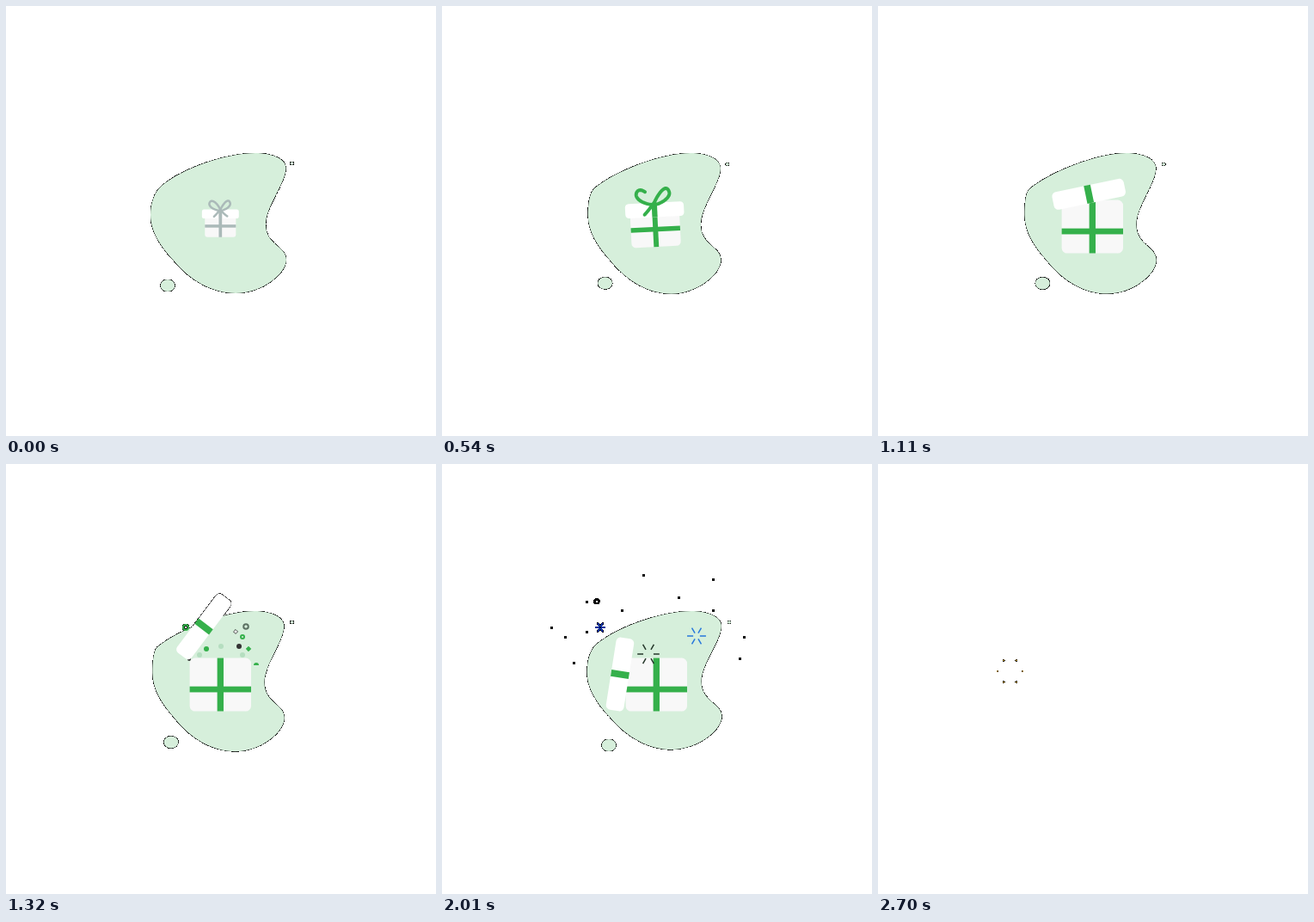
An HTML page with a canvas that plays this animation: 500 by 500 pixels, repeating every 2730 ms.

```html
<!DOCTYPE html>
<html lang="en">
<head>
<meta charset="utf-8">
<title>Gift</title>
<style>
html, body { margin: 0; width: 100%; height: 100%; overflow: hidden; background: #fff; }
canvas { display: block; width: 100vmin; height: 100vmin; }
</style>
</head>
<body>
<canvas id="stage" width="500" height="500"></canvas>
<script>
const ctx = document.getElementById('stage').getContext('2d', { willReadFrequently: true });
const LOOP = 2730, STEP = 30, SIZE = 500, TAU = Math.PI * 2;
const SCENE_END = 2640, LID_START = 1050, LID_PEAK = 1320, LID_REST = 1540;
const INK = '#222', MINT = '#d6efdb', GREEN = '#35b04b', BLUE = '#3d55f0',
  CYAN = '#1fc1ee', LIME = '#3fe02c', PINK = '#e5b8ea', DARK = '#333', PALE = '#b5dec0';

const clamp = v => Math.min(1, Math.max(0, v));
const progress = (t, from, to) => clamp((t - from) / (to - from));
const mix = (a, b, k) => a + (b - a) * k;
const easeOut = p => Math.sin(p * Math.PI / 2);

const leftBow = strand([0, -22, -14, -23, -29, -32, -23, -41], [-23, -41, -18, -48, -6, -38, 0, -24],
  [0, -24, 4, -19, 9, -14, 15, -10]);
const rightBow = strand([0, -22, 10, -23, 25, -32, 21, -40], [21, -40, 18, -49, 9, -42, 0, -25],
  [0, -25, -4, -20, -9, -14, -14, -9]);

// x, y, radius, colour at the middle of the flight
const confetti = [
  [158, 158, 3.4, BLUE], [199, 166, 3.5, LIME], [256, 158, 3.4, CYAN], [330, 158, 3.4, DARK],
  [363, 163, 2.8, LIME], [144, 192, 2.6, '#278ee8'], [168, 191, 3.3, CYAN], [135, 215, 3.2, DARK],
  [361, 191, 3.5, CYAN], [360, 195, 2.5, PINK], [403, 220, 3.4, LIME], [332, 223, 2.8, LIME],
  [178, 224, 2.5, BLUE], [203, 197, 2.6, LIME], [236, 185, 2.5, '#259df2'], [281, 185, 2.6, PINK],
  [305, 195, 2.5, BLUE], [301, 224, 2.6, LIME], [198, 216, 1.3, BLUE], [240, 196, 1.4, BLUE],
  [232, 208, 1.3, '#557'], [262, 204, 1.5, LIME], [273, 190, 1.3, '#446'], [279, 213, 1.4, BLUE],
  [291, 220, 1.5, LIME], [286, 234, 1.3, BLUE], [299, 233, 1.3, BLUE]
];

const specks = [
  [234, 129], [315, 134], [275, 155], [209, 170], [168, 160], [168, 195],
  [143, 201], [127, 190], [153, 231], [315, 170], [351, 201], [346, 226]
];

const bits = [
  [233, 215, 3, GREEN], [250, 212, 3, PALE], [271, 212, 3, DARK], [225, 222, 3, PALE],
  [275, 222, 3, PALE], [213, 227, 2, DARK], [209, 190, 3, GREEN, 'ring'],
  [279, 189, 2.8, '#5c7163', 'ring'], [275, 201, 2, GREEN, 'ring'],
  [267, 195, 2.5, '#fff', 'diamond'], [282, 215, 2.8, GREEN, 'diamond'], [291, 234, 3, GREEN, 'half']
];

const sparks = [
  [240, 221, 1750, '#26382b'], [296, 200, 1800, '#2878dc'], [184, 190, 1905, '#1440d0'],
  [358, 205, 2130, '#2878dc'], [153.5, 241, 2301, '#e8b93a']
];

function strand(...curves) {
  const points = [];
  for (const [x0, y0, x1, y1, x2, y2, x3, y3] of curves) {
    const at = (a, b, c, d, k) => a * (1 - k) ** 3 + 3 * b * k * (1 - k) ** 2 + 3 * c * k * k * (1 - k) + d * k ** 3;
    for (let i = 0; i <= 16; i++) points.push([at(x0, x1, x2, x3, i / 16), at(y0, y1, y2, y3, i / 16)]);
  }
  return points;
}

function drawStrand(points, part) {
  const count = Math.round(points.length * part);
  if (count < 2) return;
  ctx.beginPath();
  points.slice(0, count).forEach(p => ctx.lineTo(...p));
  ctx.stroke();
}

function oval(x, y, rx, ry, color) {
  if (rx <= 0) return;
  ctx.beginPath();
  ctx.ellipse(x, y, rx, ry, 0, 0, TAU);
  ctx.fillStyle = color;
  ctx.fill();
}

const disc = (x, y, r, color) => oval(x, y, r, r, color);

function circle(x, y, r, width, color) {
  ctx.beginPath();
  ctx.arc(x, y, r, 0, TAU);
  ctx.lineWidth = width;
  ctx.strokeStyle = color;
  ctx.stroke();
}

function roundRect(x, y, w, h, r, color) {
  ctx.beginPath();
  ctx.roundRect(x, y, w, h, r);
  ctx.fillStyle = color;
  ctx.fill();
}

function bar(x, y, w, h, color) {
  ctx.fillStyle = color;
  ctx.fillRect(x, y, w, h);
}

function placed(x, y, scale, angle, draw) {
  ctx.save();
  ctx.translate(x, y);
  ctx.rotate(angle);
  ctx.scale(scale, scale);
  draw();
  ctx.restore();
}

// The upper left corner gets tighter as the wave rises.
function blobPath(wave) {
  const x = mix(181, 173, wave), y = mix(209, 213.5, wave);
  return new Path2D(`M325.5 188C325 177 308 171 290 171C255 171 ${x + 24} ${y - 20} ${x} ${y}` +
    `C${mix(172, 169, wave)} ${mix(217, 218, wave)} 168 230 168 243C168 262 180 280 195 296` +
    'C214 319 240 334 267 334C298 334 326 311 326 295C326 279 302 278 302 254C302 233 326 205 325.5 188Z');
}

function drawBlob(t) {
  const wave = Math.sin(Math.PI * Math.min(t, 2200) / 2200);
  ctx.save();
  ctx.translate(249, 171);
  ctx.scale(1 - 0.03 * wave, 1 + 0.011 * wave - 0.014 * t / 2000);
  ctx.translate(-249, -171);
  ctx.fillStyle = MINT;
  ctx.fill(blobPath(wave));
  ctx.restore();
  const dip = t < 810 ? mix(325, 321, t / 810) : mix(321, 327, (t - 810) / 1200);
  oval(188 + 3 * t / 1000, dip, 8.4, 7, MINT);
  oval(t < 810 ? 332.5 - t / 810 : 331.5 + (t - 810) / 480, 183 + progress(t, 0, 540), 2, 1.7, MINT);
}

function lidPose(t) {
  const rise = progress(t, LID_START, LID_PEAK), fall = progress(t, LID_PEAK, LID_REST);
  if (t < LID_PEAK) {
    return [mix(249.5, 230, rise), mix(234.3, 189, easeOut(rise)), -53 * rise];
  }
  const settle = 3.5 * progress(t, 1560, 2010);
  return [mix(230, 207, fall), mix(189, 248, fall ** 1.5) - settle, mix(-53, -81, fall)];
}

function ribbonColor(t) {
  const k = progress(t, 0, 420);
  return `rgb(${mix(171, 53, k)},${mix(186, 176, k)},${mix(185, 75, k)})`;
}

function drawLid(color) {
  roundRect(-40.5, -10, 81, 20, 5, '#fff');
  bar(-3.7, -10, 7.4, 20, color);
}

// The gift sways about the middle of its base.
function drawGift(t) {
  const color = ribbonColor(t);
  const scale = Math.min(1.05, 0.53 + 0.00058 * t);
  const tilt = t < 810 ? 0.058 * Math.sin(TAU * t / 810) : 0;
  placed(249.3, 249.7 + 36 * scale, scale, tilt, () => {
    ctx.translate(0, -36);
    roundRect(-34, -23, 68, 59, 6, '#f8f8f8');
    bar(-3.5, -23, 7, 59, color);
    bar(-34, 8.5, 68, 6.5, color);
    if (t >= LID_START) return;
    placed(0, -15, 1, 0, () => drawLid(color));
    ctx.strokeStyle = color;
    ctx.lineWidth = 4.7;
    ctx.lineCap = ctx.lineJoin = 'round';
    drawStrand(leftBow, 1 - progress(t, 390, 690));
    drawStrand(rightBow, 1 - progress(t, 570, 960));
  });
}

function drawOpenLid(t) {
  if (t < LID_START) return;
  const [x, y, angle] = lidPose(t);
  placed(x, y, 1.05, angle * Math.PI / 180, () => drawLid(GREEN));
}

function drawConfetti(t) {
  if (t < 1350 || t > 1920) return;
  const reach = t < 1560 ? easeOut((t - 1350) / 210 * 0.7) / easeOut(0.7)
    : 1 + 0.25 * easeOut(progress(t, 1560, 1860));
  const size = 1 - progress(t, 1650, 1920);
  for (const [x, y, r, color] of confetti) {
    disc(mix(249, x, reach), mix(250, y, reach), r * size, color);
  }
}

function drawBits(t) {
  if (t < 1230 || t > 1500) return;
  const reach = progress(t, 1200, 1320) + 0.4 * progress(t, 1320, 1500);
  const size = 1 - progress(t, 1380, 1500);
  for (const [x, y, r, color, kind] of bits) {
    placed(mix(249, x, reach), mix(238, y, reach), size, 0, () => {
      if (kind === 'ring') {
        circle(0, 0, r, 2, color);
      } else if (kind === 'diamond') {
        ctx.rotate(Math.PI / 4);
        bar(-r / 1.4, -r / 1.4, r * 1.4, r * 1.4, color);
        ctx.lineWidth = 0.8;
        ctx.strokeStyle = color === '#fff' ? INK : color;
        ctx.strokeRect(-r / 1.4, -r / 1.4, r * 1.4, r * 1.4);
      } else if (kind === 'half') {
        ctx.beginPath();
        ctx.arc(0, 0, r, Math.PI, TAU);
        ctx.fillStyle = color;
        ctx.fill();
      } else disc(0, 0, r, color);
    });
  }
}

function drawSpecks(t) {
  const size = progress(t, 1740, 1890) * (1 - progress(t, 2010, 2160));
  for (const [x, y] of specks) disc(x + 0.5, y + 0.5, 1.5 * size, '#111');
}

function drawRing(t) {
  if (t >= 1500 && t <= 2250) circle(180, 159.7, 2.4, 1.6, '#000');
}

function drawSparks(t) {
  ctx.lineCap = 'butt';
  for (const [x, y, start, color] of sparks) {
    const p = (t - start) / 420;
    if (p <= 0 || p >= 1) continue;
    const inner = 15.5 * p * p, outer = 15.5 * easeOut(p);
    ctx.strokeStyle = color;
    ctx.lineWidth = 1.5;
    ctx.beginPath();
    for (let i = 0; i < 6; i++) {
      const c = Math.cos(i * TAU / 6), s = Math.sin(i * TAU / 6);
      ctx.moveTo(x + c * inner, y + s * inner);
      ctx.lineTo(x + c * outer, y + s * outer);
    }
    ctx.stroke();
  }
}

// Soft edges turn opaque against black, which gives each shape its thin dark rim.
function hardenEdges() {
  const image = ctx.getImageData(0, 0, SIZE, SIZE), px = image.data;
  for (let i = 0; i < px.length; i += 4) {
    const alpha = px[i + 3];
    if (alpha === 0 || alpha === 255) continue;
    for (let c = 0; c < 3; c++) px[i + c] *= alpha / 255;
    px[i + 3] = 255;
  }
  ctx.putImageData(image, 0, 0);
}

function draw(t) {
  ctx.clearRect(0, 0, SIZE, SIZE);
  if (t < SCENE_END) {
    drawBlob(t);
    drawBits(t);
    drawGift(t);
    drawOpenLid(t);
    drawConfetti(t);
    drawSpecks(t);
    drawRing(t);
  }
  drawSparks(t);
  hardenEdges();
}

const origin = performance.now();
function tick() {
  const t = (performance.now() - origin) % LOOP;
  draw(Math.floor(t / STEP) * STEP);
  requestAnimationFrame(tick);
}
tick();
</script>
</body>
</html>
```
